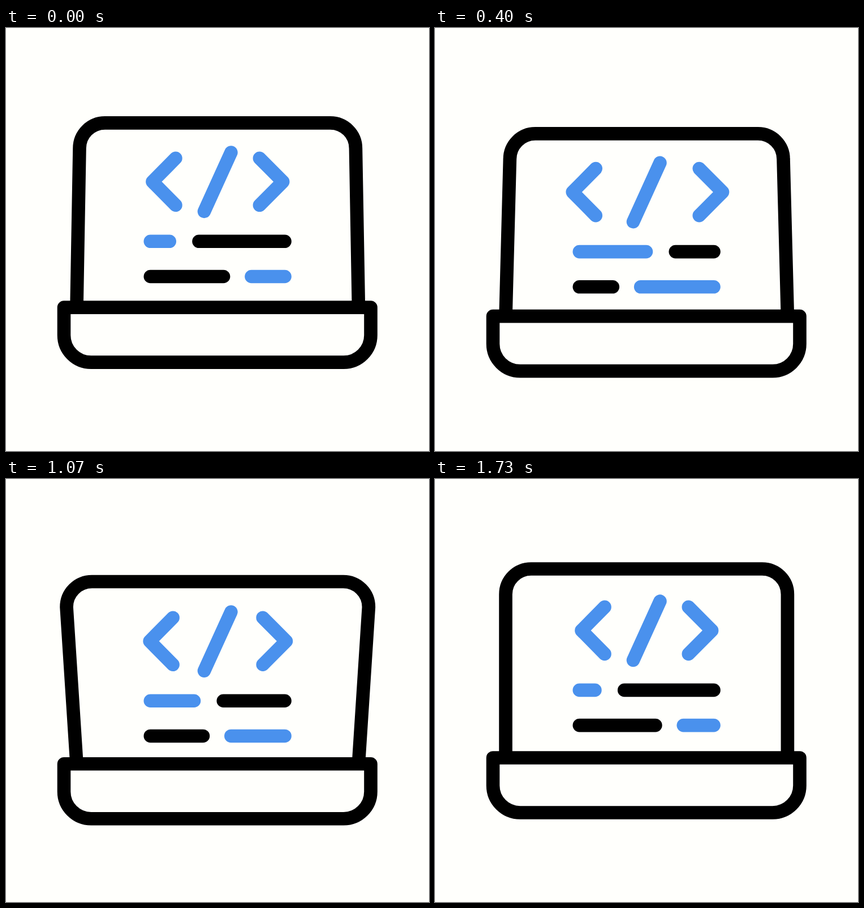
An HTML page for the animation above (1790 ms loop, 748 px wide and 748 px high).

```html
<!DOCTYPE html>
<html lang="en">
<head>
<meta charset="utf-8">
<title>Laptop with code</title>
<style>
  html, body { margin: 0; width: 100%; height: 100%; overflow: hidden; background: #fffffc; }
  svg { display: block; width: 100vw; height: 100vh; }
  path { fill: none; stroke: #000; stroke-width: 23.6; stroke-linecap: round; stroke-linejoin: round; }
  .blue { stroke: #4a91ed; }
  #lid { stroke-linecap: butt; }
</style>
</head>
<body>
<svg viewBox="0 0 748 748">
  <path id="lid"/>
  <path id="base" d="M102.5 492.5H645V541.5A48 48 0 0 1 597 589.5H150.5A48 48 0 0 1 102.5 541.5Z"/>
  <g id="code">
    <path id="left" class="blue" d="M300 226L259 267.5L300 309"/>
    <path id="slash" class="blue" d="M397.9 215.8L350.5 320"/>
    <path id="right" class="blue" d="M448.3 226L489.6 267.5L448.3 309"/>
    <path id="row1a" class="blue"/>
    <path id="row1b"/>
    <path id="row2a"/>
    <path id="row2b" class="blue"/>
  </g>
</svg>
<script>
  const LOOP = 1790, STEPS = 27, STEP_MS = 200 / 3;

  const el = {};
  document.querySelectorAll('[id]').forEach(e => { el[e.id] = e; });

  const progress = (s, a, b) => Math.min(1, Math.max(0, (s - a) / (b - a)));
  const easeInOut = p => (1 - Math.cos(Math.PI * p)) / 2;
  const easeOut = p => Math.sin(Math.PI * p / 2);
  const easeSteep = p => p ** 3 * (p * (6 * p - 15) + 10);

  // Rises from 0 to 1 between steps a and b, falls back between c and d
  const hump = (s, a, b, c, d, rise = easeInOut) =>
    rise(progress(s, a, b)) * (1 - easeSteep(progress(s, c, d)));

  // Lid tips away (positive) and then towards the viewer (negative)
  function leanAt(s) {
    const away = 11.2 * Math.sin(Math.PI * progress(s, -1, 8.5) ** 0.85);
    return away - 19.3 * hump(s, 8.5, 15, 14.5, 21.5, easeOut);
  }

  function move(id, x, y) {
    el[id].setAttribute('transform', `translate(${x} ${y})`);
  }

  function drawLid(lean, top, foot) {
    const l = 125 + lean, r = 623.4 - lean, k = 20;
    const shoulder = top + 45;
    el.lid.setAttribute('d',
      `M125 ${foot}L${l} ${shoulder}C${l} ${top + k} ${l + k} ${top} ${l + 45} ${top}`
      + `H${r - 45}C${r - k} ${top} ${r} ${top + k} ${r} ${shoulder}L623.4 ${foot}`);
  }

  // Two bars share a row, split at x with a gap
  function drawRow(row, y, x, gap) {
    el[row + 'a'].setAttribute('d', `M255.3 ${y}H${x}`);
    el[row + 'b'].setAttribute('d', `M${x + gap} ${y}H493`);
  }

  function draw(now) {
    const step = Math.min(STEPS - 1, Math.floor((now % LOOP + 5) / STEP_MS));
    const s = step === STEPS - 1 ? -1 : step; // the last step already starts the next rise

    const sink = 20.3 * hump(s, -2, 8.8, 10.4, 22.3);
    const scroll = 25.3 * hump(s, -1.1, 9, 13, 21.5, easeOut);
    const slide = 106 * hump(s, -1.8, 8.4, 10.4, 21.4);
    const spread = 16.8 * hump(s, -0.3, 7.2, 10.4, 19.5);
    const lean = leanAt(s);
    const shorten = lean * (lean > 0 ? 1.52 : -0.65);

    move('base', 0, sink);
    drawLid(lean, 158.6 + sink + shorten, 492.5 + sink);
    move('code', 0, scroll);
    move('left', -spread, 0);
    move('right', 1.2 * spread, 0);
    el.slash.style.visibility = s >= 9 && s < 14 ? 'hidden' : 'visible';
    drawRow('row1', 373, 281.3 + slide, 51.8);
    drawRow('row2', 435.2, 391.2 - 0.835 * slide, 49.4);
  }

  let start;
  function tick(now) {
    start ??= now;
    draw(now - start);
    requestAnimationFrame(tick);
  }
  draw(0);
  requestAnimationFrame(tick);
</script>
</body>
</html>
```
